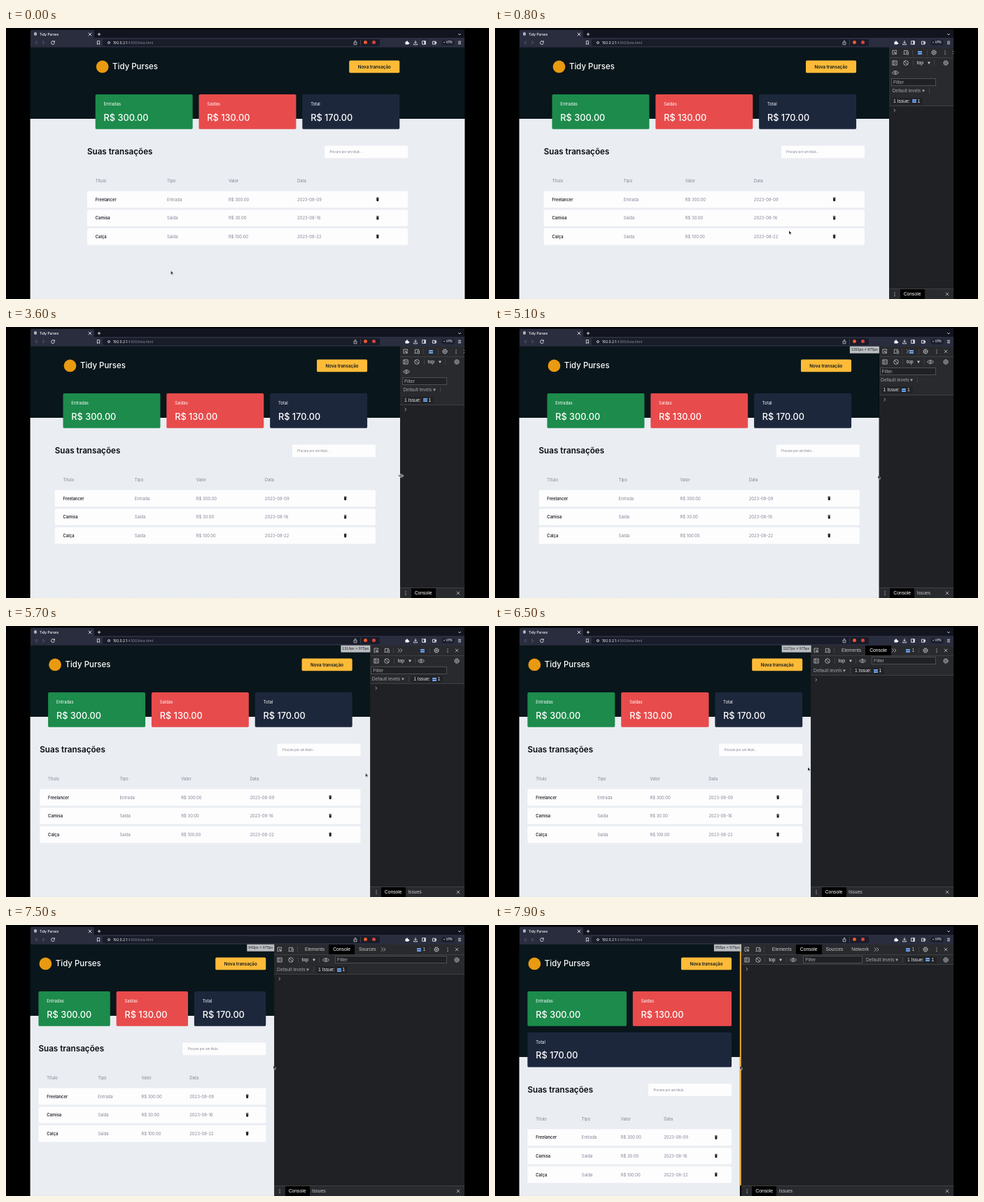
Animation of 690x388 px, one loop 8000 ms. Source, as an HTML page:

```html
<!DOCTYPE html>
<html lang="pt">
<head>
<meta charset="utf-8">
<title>Tidy Purses</title>
<style>
@property --px { syntax: "<integer>"; inherits: true; initial-value: 1680; }

html, body { margin: 0; width: 100%; height: 100%; overflow: hidden; background: #000; }
#stage {
  position: relative; width: 690px; height: 388px; overflow: hidden; background: #000;
  font: 5.9px Inter, sans-serif; color: #fff;
  --k: .36952; /* a 1680px wide screen scaled to the stage */
  animation: drag 8s -10ms infinite;
}
#stage div, #stage span, #stage svg { position: absolute; box-sizing: border-box; }
#stage span { line-height: 0; white-space: nowrap; }
#stage svg { width: 8px; height: 8px; margin: -4px; overflow: visible; }
symbol { fill: none; stroke: currentColor; stroke-width: .8; overflow: visible; }
.dot { border-radius: 50%; }
.sep { width: .5px; height: 8px; margin-top: -4px; background: #3e4044; }

/* Browser frame */
.strip { left: 34.6px; top: 2px; width: 620.8px; height: 13px; background: #12141f; }
.tab { left: 35px; top: 3px; width: 91px; height: 14px; border-radius: 2px 2px 0 0; background: #2a2d3e; }
.bar { left: 34.6px; top: 14px; width: 620.8px; height: 14px; background: #2a2d3e; }
.url { left: 138px; top: 15.5px; width: 396px; height: 10px; border-radius: 2px; background: #191c29; }
.chrome span { font-size: 5px; }
.vpn { left: 622px; top: 16.5px; width: 18.5px; height: 8px; border-radius: 4px; background: #1d202e; }

/* Web page, in its own screen pixels */
.page {
  left: 0; top: 0; width: calc(var(--px) * 1px); height: 975px; font-size: 16px;
  transform: translate(34.6px, 27.7px) scale(var(--k)); transform-origin: 0 0;
  container: page / inline-size;
}
.sheet { inset: 0; --hero: 277px; background: linear-gradient(#09161b var(--hero), #eaedf2 0); }
.head, .main { left: 0; right: 0; top: 0; margin: auto; width: min(1176px, 100% - 64px); }
.main { width: min(1240px, 100% - 64px); }
.logo { left: 3px; top: 51px; width: 48px; height: 48px; background: #e99a10; }
.brand { left: 66px; top: 75px; font-size: 31px; font-weight: 500; }
.button { right: 0; top: 51px; width: 195px; height: 48px; border-radius: 5px; background: #ffbb38; }
.button span { left: 50%; top: 24px; transform: translateX(-50%); color: #0a171c; font-size: 16.8px; font-weight: 600; }
.cards { left: 0; right: 0; top: 182px; display: grid; grid-template-columns: repeat(3, 1fr); gap: 24px; }
#stage .card { position: relative; height: 135px; border-radius: 5px; }
.card span { left: 32px; top: 36.5px; }
.card span + span { top: 89.5px; font-size: 34.5px; font-weight: 500; }
h2 { position: absolute; margin: 0; left: 0; top: 404px; line-height: 0; white-space: nowrap; color: #07090f; font-size: 31.6px; font-weight: 600; }
.search { right: 0; top: 381px; width: 322px; height: 48px; border-radius: 5px; background: #fdfdfe; }
.search span { left: 20px; top: 24px; color: #777a8a; font-size: 11.7px; }
.row { left: 0; right: 0; height: 64px; border-radius: 5px; background: #fdfdfe; color: #838696; }
.row.th { background: none; }
.row span { top: 32px; left: 32px; }
.row:not(.th) span:first-child { color: #0c0f16; font-weight: 500; }
.row span:nth-child(2) { left: calc(36px + 22%); }
.row span:nth-child(3) { left: calc(35px + 41.27%); }
.row span:nth-child(4) { left: calc(28px + 63.25%); }
#stage .row svg { left: calc(40px + 87.3%); top: 32px; width: 20px; height: 20px; margin: -10px; color: #1d2027; }
.thumb { display: none; right: 0; top: 0; width: 5px; height: 934px; background: #ffbb38; }
.size { right: 0; top: 0; height: 25px; padding: 0 5px; background: #babdc1; color: #26282b; font: 14.4px/25px "Liberation Sans", sans-serif; white-space: nowrap; animation: show 8s -10ms infinite; }
.size::before { counter-reset: px var(--px); content: counter(px) "px × 975px"; }
@container page (max-width: 900px) {
  .sheet { --hero: 436px; right: 5px !important; }
  .thumb { display: block; }
  .cards { grid-template-columns: 1fr 1fr; }
  .card:last-child { grid-column: span 2; }
  .main { top: 159px; }
}

/* Developer panel */
.dev { left: calc(34.6px + var(--px) * var(--k) * 1px); right: 34.6px; top: 28px; height: 360px; overflow: hidden; background: #202124; color: #c3c6ca; font: 6.75px "Liberation Sans", sans-serif; container: dev / inline-size; }
.tools {
  inset: 0;
  --eye: 9px; --eyeY: 36px; --fl: 3px; --fr: 25px; --fy: 49px;
  --lv: 4.5px; --ly: 62px; --is: 3px; --iy: 76.5px; --end: 84px;
}
.panel { left: 0; right: 0; top: 0; height: var(--end); background: #292a2d; border-bottom: .6px solid #3d3f43; }
.line { left: 0; right: 0; top: 13.5px; height: .6px; background: #3d3f43; }
.tabs { left: 38px; top: 0; height: 13.5px; display: flex; }
#stage .tabs > * { position: relative; flex: none; }
.tabs b, .drawer b { padding: 0 6px; font-weight: 400; line-height: 13.5px; display: none; }
.on { background: #000; color: #fff; }
.more { width: 9px; display: none; }
.ends { left: max(100% - 72px, 32px); top: 7px; width: 72px; }
.badge { width: 6px; height: 5px; margin-top: -2.5px; border-radius: .8px; background: linear-gradient(#6fa2ee 35%, #35507c 0 55%, #6fa2ee 0); }
.one { display: none; }
.filter { left: var(--fl); right: var(--fr); top: var(--fy); height: 11px; margin-top: -5.5px; border: .6px solid #4c4f53; background: #202124; color: #a5a9ae; }
.filter span { left: 2px; top: 5px; }
.levels { left: var(--lv); top: var(--ly); color: #9da1a6; }
.issue { left: var(--is); top: var(--iy); width: 45px; height: 10px; margin-top: -5px; border-radius: 1px; background: #222326; color: #e8eaed; }
.issue span, .issue .badge { top: 5px; }
.drawer { left: 0; right: 0; bottom: 0; height: 15px; background: #292a2d; border-top: .6px solid #3d3f43; }
.drawer b { position: absolute; top: 0; line-height: 14.5px; }
.drawer .on { display: block; left: 15.5px; padding: 0 5.2px; }
@container dev (min-width: 106px) {
  .tools { --eye: 73px; --eyeY: 21.5px; --fl: 1px; --fy: 35px; --lv: 2.5px; --ly: 48px; --iy: 62px; --end: 70px; }
  .more, .drawer b { display: block; }
}
@container dev (min-width: 124px) { .tools { --is: 59px; --iy: 48px; --end: 55px; } }
@container dev (min-width: 155px) {
  .tabs .on, .one { display: block; }
  .ends .badge { left: 4px !important; }
}
@container dev (min-width: 186px) { .tools { --eye: 74px; --fl: 87px; --fy: 21.5px; --lv: 4px; --ly: 36px; --is: 60px; --iy: 36px; --end: 43px; } }
@container dev (min-width: 194px) { .tabs .t1 { display: block; } }
@container dev (min-width: 236px) { .tabs .t2 { display: block; } }
@container dev (min-width: 274px) { .tabs .t3 { display: block; } }
@container dev (min-width: 293px) {
  .tools { --fl: 88.5px; --fr: 130px; --lv: calc(100% - 125.5px); --ly: 21.5px; --is: calc(100% - 69.5px); --iy: 21.5px; --end: 29px; }
}

/* Pointer */
.mouse { left: 0; top: 0; animation: move 8s -10ms infinite; }
#stage .mouse svg { margin: 0; }
.arrow { animation: arrow 8s -10ms infinite; }
.split { left: -4px; top: -4px; animation: split 8s -10ms infinite; }

@keyframes drag {
  0% { --px: 1680; animation-timing-function: steps(1); }
  1.25% { --px: 1430; }
  60% { --px: 1430; animation-timing-function: steps(9); }
  71.25% { --px: 1314; animation-timing-function: steps(8); }
  81.25% { --px: 1127; animation-timing-function: steps(5); }
  87.5% { --px: 1050; animation-timing-function: steps(9); }
  98.75%, 100% { --px: 858; }
}
@keyframes move {
  0% { transform: translate(235.5px, 347.5px); animation-timing-function: steps(8); }
  10% { transform: translate(420px, 290px); }
  12.5% { transform: translate(420px, 290px); animation-timing-function: steps(5); }
  18.75% { transform: translate(470px, 262px); }
  22.5% { transform: translate(470px, 262px); animation-timing-function: steps(4); }
  27.5% { transform: translate(498.7px, 249.2px); animation-timing-function: steps(5); }
  33.75% { transform: translate(556px, 226px); }
  36.25% { transform: translate(556px, 226px); animation-timing-function: steps(7); }
  45% { transform: translate(564px, 213px); }
  60% { transform: translate(564px, 213px); animation-timing-function: steps(9); }
  71.25% { transform: translate(513.6px, 210.6px); animation-timing-function: steps(8); }
  81.25% { transform: translate(447px, 202px); animation-timing-function: steps(5); }
  87.5% { transform: translate(422px, 200.2px); animation-timing-function: steps(9); }
  98.75%, 100% { transform: translate(350px, 201.5px); }
}
@keyframes show { 0%, 61.24% { opacity: 0; } 61.25%, 100% { opacity: 1; } }
@keyframes arrow { 0%, 43.74%, 61.25%, 100% { opacity: 1; } 43.75%, 61.24% { opacity: 0; } }
@keyframes split { 0%, 43.74%, 61.25%, 100% { opacity: 0; } 43.75%, 61.24% { opacity: 1; } }
</style>
</head>
<body>
<svg width="0" height="0" style="position:absolute">
  <symbol id="inspect" viewBox="0 0 8 8"><path d="M3 6.6H1V1H6.6V3M3.4 3.4 7 4.7 5.4 5.4 4.7 7ZM5.5 5.5 7 7"/></symbol>
  <symbol id="device" viewBox="0 0 8 8"><path d="M1.4 5.7V1.3H7M.4 6.4H4M5 3H7.4V6.8H5Z"/></symbol>
  <symbol id="gear" viewBox="0 0 8 8"><circle cx="4" cy="4" r="2.6"/><circle cx="4" cy="4" r=".9"/><circle cx="4" cy="4" r="3.4" stroke-dasharray="1.33 1.34"/></symbol>
  <symbol id="dots" viewBox="0 0 8 8"><path d="M4 1.2v1.1M4 3.5v1.1M4 5.8v1.1" stroke-width="1.1"/></symbol>
  <symbol id="close" viewBox="0 0 8 8"><path d="M1.8 1.8 6.2 6.2M6.2 1.8 1.8 6.2"/></symbol>
  <symbol id="more" viewBox="0 0 8 8"><path d="M1 1.4 3.6 4 1 6.6M4.4 1.4 7 4 4.4 6.6"/></symbol>
  <symbol id="side" viewBox="0 0 8 8"><path d="M.8 1H7.2V7H.8ZM2.8 1V7M5.8 2.8 4.4 4 5.8 5.2"/></symbol>
  <symbol id="block" viewBox="0 0 8 8"><circle cx="4" cy="4" r="3.3"/><path d="M1.7 1.7 6.3 6.3"/></symbol>
  <symbol id="eye" viewBox="0 0 8 8"><path d="M-.6 4Q4-1 8.6 4 4 9-.6 4Z"/><circle cx="4" cy="4" r="1.2"/></symbol>
  <symbol id="prompt" viewBox="0 0 8 8"><path d="M2.7 2 4.8 4 2.7 6"/></symbol>
  <symbol id="down" viewBox="0 0 8 8"><path d="M2 2.5H6L4 6Z" fill="currentColor" stroke="none"/></symbol>
  <symbol id="chev" viewBox="0 0 8 8"><path d="M2.2 3.2 4 4.9 5.8 3.2"/></symbol>
  <symbol id="plus" viewBox="0 0 8 8"><path d="M4 1.8V6.2M1.8 4H6.2"/></symbol>
  <symbol id="back" viewBox="0 0 8 8"><path d="M5.2 1.8 2.6 4 5.2 6.2Z" stroke-width=".6"/></symbol>
  <symbol id="reload" viewBox="0 0 8 8"><path d="M6 2.7A2.4 2.4 0 1 0 6.4 4.3M6.4 1.4V3.1H4.7"/></symbol>
  <symbol id="mark" viewBox="0 0 8 8"><path d="M2.4 1.6H5.6V6.6L4 5.2 2.4 6.6Z" stroke-width=".7"/></symbol>
  <symbol id="share" viewBox="0 0 8 8"><path d="M3 3.2H2V6.8H6V3.2H5M4 5V1.2M2.9 2.2 4 1.2 5.1 2.2" stroke-width=".6"/></symbol>
  <symbol id="puzzle" viewBox="0 0 8 8"><path d="M1.5 2.8H3.1A.9.9 0 1 1 4.7 2.8H6V4.1A.9.9 0 1 1 6 5.6V6.6H1.5Z" fill="currentColor" stroke="none"/></symbol>
  <symbol id="load" viewBox="0 0 8 8"><path d="M4 1V4.8M2.4 3.4 4 5 5.6 3.4M1.5 5.4V6.8H6.5V5.4"/></symbol>
  <symbol id="split-view" viewBox="0 0 8 8"><path d="M1.6 1.7H6.4V6.3H1.6ZM4.8 1.7V6.3M5.5 1.7V6.3"/></symbol>
  <symbol id="wallet" viewBox="0 0 8 8"><path d="M1.4 2.2H6V6.2H1.4ZM4.4 3.6H6.6V4.9H4.4Z"/></symbol>
  <symbol id="menu" viewBox="0 0 8 8"><path d="M2 2.2H6M2 4H6M2 5.8H6" stroke-width=".7"/></symbol>
  <symbol id="trash" viewBox="0 0 8 8"><path d="M1.9 1.7H6.1M3.2 1.2H4.8"/><path d="M2.2 2.4H5.8L5.5 6.8H2.5Z" fill="currentColor" stroke="none"/></symbol>
</svg>

<div id="stage">
  <div class="chrome">
    <div class="strip"></div><div class="tab"></div><div class="bar"></div><div class="url"></div>
    <div class="dot" style="left:39.7px;top:6.2px;width:4.6px;height:4.6px;background:#aeb2c0"></div>
    <span style="left:48px;top:8.5px;font-weight:500;font-size:4.8px">Tidy Purses</span>
    <svg style="left:120px;top:8.5px"><use href="#close"/></svg>
    <svg style="left:132.5px;top:8.5px"><use href="#plus"/></svg>
    <svg style="left:648px;top:8.5px"><use href="#chev"/></svg>
    <svg style="left:43px;top:20.5px;color:#62667a"><use href="#back"/></svg>
    <svg style="left:54px;top:20.5px;color:#62667a;transform:scaleX(-1)"><use href="#back"/></svg>
    <svg style="left:66.5px;top:20.5px"><use href="#reload"/></svg>
    <svg style="left:132px;top:20.5px"><use href="#mark"/></svg>
    <div class="dot" style="left:145px;top:18.5px;width:4px;height:4px;border:.7px solid #c3c6d2"></div>
    <span style="left:153px;top:20.5px;color:#8a8d9c"><i style="color:#fff;font-style:normal">192.0.2.1</i>:4300/lista.html</span>
    <svg style="left:499px;top:20.5px"><use href="#share"/></svg>
    <div class="sep" style="left:506px;top:20.5px"></div>
    <div class="dot" style="left:510.5px;top:17.7px;width:5.6px;height:5.6px;background:#f2572f"></div>
    <div class="dot" style="left:523px;top:18px;width:5px;height:5px;background:#d8433f"></div>
    <svg style="left:573px;top:20.5px"><use href="#puzzle"/></svg>
    <svg style="left:585px;top:20.5px"><use href="#load"/></svg>
    <svg style="left:597px;top:20.5px"><use href="#split-view"/></svg>
    <svg style="left:611.5px;top:20.5px"><use href="#wallet"/></svg>
    <div class="vpn"></div>
    <div class="dot" style="left:625px;top:19.6px;width:1.8px;height:1.8px;background:#b4b7c4"></div>
    <span style="left:628.5px;top:20.5px;font-size:4.4px">VPN</span>
    <svg style="left:648px;top:20.5px"><use href="#menu"/></svg>
  </div>

  <div class="dev">
    <div class="tools">
      <div class="panel"></div><div class="line"></div>
      <svg style="left:8.4px;top:7px"><use href="#inspect"/></svg>
      <svg style="left:24.3px;top:7px"><use href="#device"/></svg>
      <div class="sep" style="left:32.5px;top:7px"></div>
      <div class="tabs">
        <b class="t1">Elements</b><b class="on">Console</b><b class="t2">Sources</b><b class="t3">Network</b>
        <div class="more"><svg style="left:4.5px;top:7px"><use href="#more"/></svg></div>
      </div>
      <div class="ends">
        <div class="badge" style="left:9px;top:0"></div><span class="one" style="left:12px;top:0">1</span>
        <div class="sep" style="left:22px;top:0"></div>
        <svg style="left:32px;top:0"><use href="#gear"/></svg>
        <svg style="left:47.5px;top:0"><use href="#dots"/></svg>
        <svg style="left:60.5px;top:0"><use href="#close"/></svg>
      </div>
      <svg style="left:8.4px;top:21.5px"><use href="#side"/></svg>
      <svg style="left:24.3px;top:21.5px"><use href="#block"/></svg>
      <div class="sep" style="left:33.5px;top:21.5px"></div>
      <span style="left:39.5px;top:21.5px;color:#e8eaed">top</span>
      <svg style="left:56.5px;top:21.5px"><use href="#down"/></svg>
      <div class="sep" style="left:64px;top:21.5px"></div>
      <svg style="left:var(--eye);top:var(--eyeY)"><use href="#eye"/></svg>
      <div class="filter"><span>Filter</span></div>
      <div class="levels"><span>Default levels</span><svg style="left:44px;top:0"><use href="#down"/></svg><div class="sep" style="left:52px;top:0"></div></div>
      <div class="issue"><span style="left:3px">1 Issue:</span><div class="badge" style="left:29.5px"></div><span style="left:37.5px">1</span></div>
      <svg style="right:11.5px;top:21.5px"><use href="#gear"/></svg>
      <svg style="left:8.4px;top:calc(var(--end) + 6.2px)"><use href="#prompt"/></svg>
      <div class="drawer">
        <svg style="left:8.4px;top:7px"><use href="#dots"/></svg>
        <b class="on">Console</b><b style="left:48px">Issues</b>
        <svg style="right:9.5px;top:7px"><use href="#close"/></svg>
      </div>
    </div>
  </div>

  <div class="page">
    <div class="sheet">
      <div class="head">
        <div class="logo dot"></div>
        <span class="brand">Tidy Purses</span>
        <div class="button"><span>Nova transação</span></div>
        <div class="cards">
          <div class="card" style="background:#1c8b4b"><span>Entradas</span><span>R$ 300.00</span></div>
          <div class="card" style="background:#e84b4b"><span>Saídas</span><span>R$ 130.00</span></div>
          <div class="card" style="background:#1d273c"><span>Total</span><span>R$ 170.00</span></div>
        </div>
      </div>
      <div class="main">
        <h2>Suas transações</h2>
        <div class="search"><span>Procure por um título...</span></div>
        <div class="row th" style="top:486px"><span>Título</span><span>Tipo</span><span>Valor</span><span>Data</span></div>
        <div class="row" style="top:557px"><span>Freelancer</span><span>Entrada</span><span>R$ 300.00</span><span>2023-08-09</span><svg><use href="#trash"/></svg></div>
        <div class="row" style="top:629px"><span>Camisa</span><span>Saída</span><span>R$ 30.00</span><span>2023-08-16</span><svg><use href="#trash"/></svg></div>
        <div class="row" style="top:701px"><span>Calça</span><span>Saída</span><span>R$ 100.00</span><span>2023-08-22</span><svg><use href="#trash"/></svg></div>
      </div>
    </div>
    <div class="thumb"></div>
    <div class="size"></div>
  </div>

  <div class="mouse">
    <svg class="arrow" viewBox="0 0 8 8"><path d="M0 0V5.4L1.3 4.3 2.1 6.2 3 5.8 2.2 4H3.8Z" fill="#000" stroke="#fff" stroke-width=".5"/></svg>
    <svg class="split" viewBox="0 0 8 8"><path d="M3.4 1V7M4.6 1V7M3.4 4H1M4.6 4H7M1.9 2.8.7 4 1.9 5.2M6.1 2.8 7.3 4 6.1 5.2" fill="none" stroke="#fff" stroke-width="1.5"/><path d="M3.4 1V7M4.6 1V7M3.4 4H1M4.6 4H7M1.9 2.8.7 4 1.9 5.2M6.1 2.8 7.3 4 6.1 5.2" fill="none" stroke="#000" stroke-width=".6"/></svg>
  </div>
</div>
</body>
</html>
```
